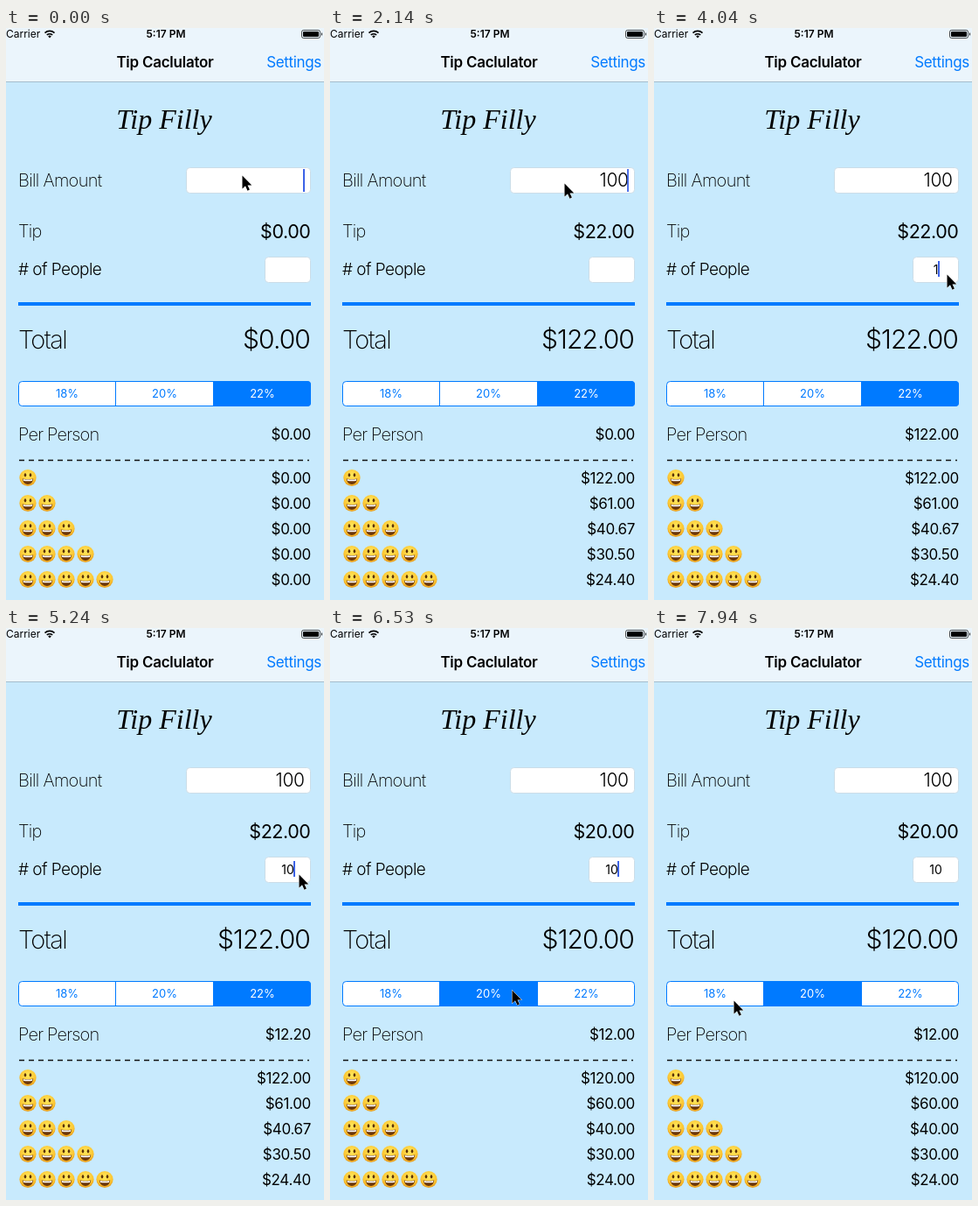
These frames come from a looping animation (364 px wide and 653 px high, 8 s). An HTML page:

```html
<!DOCTYPE html>
<html lang="en">
<head>
<meta charset="utf-8">
<title>Tip calculator</title>
<style>
  html, body { margin: 0; width: 100%; height: 100%; overflow: hidden; background: #c8eafd; }
  svg { display: block; width: 364px; height: 653px; }
  text { font: 400 17px Inter, "Open Sans", sans-serif; letter-spacing: -.02em; }
  .end { text-anchor: end; }
  .mid { text-anchor: middle; }
  .label { font-size: 20px; font-weight: 200; letter-spacing: -.035em; }
  .status { font-size: 12px; letter-spacing: 0; }
  .seg { font-size: 13px; letter-spacing: 0; }
  .field { fill: #fff; stroke: #cbdde8; }
  .blue { fill: #007aff; }
</style>
</head>
<body>
<svg viewBox="0 0 364 653">
  <defs>
    <radialGradient id="skin" cy=".35" r=".7">
      <stop stop-color="#ffe95c"/><stop offset=".65" stop-color="#fcc633"/><stop offset="1" stop-color="#e08a12"/>
    </radialGradient>
    <g id="face">
      <circle r="9.6" fill="url(#skin)"/>
      <ellipse cx="-3" cy="-3.2" rx="1.3" ry="2.1" fill="#5b3208"/>
      <ellipse cx="3" cy="-3.2" rx="1.3" ry="2.1" fill="#5b3208"/>
      <path d="M-6.3 1Q0 2.4 6.3 1Q5.4 7.4 0 7.4T-6.3 1Z" fill="#6b3609"/>
      <path d="M-5.4 1.6Q0 2.6 5.4 1.6L5 3.4Q0 4.2-5 3.4Z" fill="#fff"/>
    </g>
  </defs>

  <rect width="364" height="653" fill="#c8eafd"/>
  <rect width="364" height="61" fill="#ebf5fc"/>
  <rect y="61" width="364" height="1" fill="#a5bccb"/>

  <text class="status" y="11">Carrier</text>
  <g fill="none" stroke="#000" stroke-width="1.7">
    <path d="M44.5 5.6a8 8 0 0 1 11 0M46.8 8a4.7 4.7 0 0 1 6.4 0"/>
  </g>
  <path d="M50 11.4l-1.8-2a2.6 2.6 0 0 1 3.6 0z"/>
  <text class="status mid" x="183" y="11" style="font-weight:600">5:17 PM</text>
  <rect x="338.5" y="2.5" width="21" height="9" rx="2" fill="none" stroke="#000" stroke-width=".7"/>
  <rect x="340" y="4" width="18" height="6" rx="1"/>
  <path d="M361 5q2 2 0 4z"/>

  <text class="mid" x="182" y="45" style="font-weight:600;letter-spacing:-.015em">Tip Caclulator</text>
  <text class="end blue" x="361" y="45">Settings</text>
  <text class="mid" x="181" y="115" style="font:italic 32px 'Liberation Serif',serif;letter-spacing:0">Tip Filly</text>

  <text class="label" x="14" y="181">Bill Amount</text>
  <rect class="field" x="206.5" y="159.5" width="142" height="29" rx="4"/>
  <text class="end" id="bill" x="341.5" y="181" style="font-size:21px;font-weight:300"></text>

  <text class="label" x="14" y="239">Tip</text>
  <text class="end" id="tip" x="348.5" y="239.5" style="font-size:21.5px"></text>

  <text x="14" y="282" style="font-size:19px;font-weight:300;letter-spacing:-.03em"># of People</text>
  <rect class="field" x="296.5" y="261.5" width="52" height="29" rx="4"/>
  <text class="mid" id="people" x="322.5" y="280.5" style="font-size:14px;letter-spacing:0"></text>

  <rect class="blue" x="14" y="313" width="335" height="4"/>
  <text x="14" y="366" style="font-size:29px;font-weight:200;letter-spacing:-.055em">Total</text>
  <text class="end" id="total" x="348" y="366" style="font-size:30px;font-weight:300;letter-spacing:-.03em"></text>

  <rect x="14.5" y="403.5" width="334" height="28" rx="4" fill="#fff"/>
  <g id="segments"></g>
  <rect x="14.5" y="403.5" width="334" height="28" rx="4" fill="none" stroke="#007aff"/>

  <text class="label" x="14" y="471" style="letter-spacing:-.04em">Per Person</text>
  <text class="end" id="each" x="349" y="470"></text>
  <path d="M15 493.5H347" stroke="#111" stroke-width="1.4" stroke-dasharray="6 5"/>
  <g id="rows"></g>

  <rect id="caret" width="2" fill="#3d63e6"/>
  <path id="mouse" d="M0 0V15L3.5 11.8L6 17.2L8.4 16.1L6 10.9H10.8Z" stroke="#fff" stroke-width="1" stroke-linejoin="round" paint-order="stroke"/>
</svg>
<script>
const LOOP = 8000, STEP = 118.6;
const $ = id => document.getElementById(id);
const money = n => '$' + n.toFixed(2);

// All tables below are keyed by step number.
const path = [
  [1, 270, 168], [6, 268, 177], [18, 268, 177], [22, 346, 272], [24, 335, 281],
  [44, 335, 281], [50, 208, 405], [52, 208, 413], [60, 208, 413], [66, 97, 428], [67, 91, 425]
];
const blink = [
  [0, 1], [2, .4], [3, 0], [6, 1], [18, .9], [19, 0], [22, 1],
  [25, .5], [26, .85], [30, .4], [31, 0], [34, 1], [40, .4], [41, 0], [44, 1],
  [48, .4], [49, 0], [52, 1], [56, .4], [57, 0], [60, .45], [61, 1], [64, .4], [65, 0]
];
const bills = [[0, 0], [8, 1], [11, 10], [14, 100]];
const counts = [[0, 0], [34, 1], [35, 10]];
const rates = [[0, 22], [55, 20]];
const at = (table, k) => table.filter(e => e[0] <= k).pop()[1];

function mousePos(k) {
  const i = path.findIndex(p => p[0] > k);
  if (i === 0) return path[0].slice(1);
  if (i < 0) return path[path.length - 1].slice(1);
  const [a, b] = [path[i - 1], path[i]];
  const u = (k - a[0]) / (b[0] - a[0]), s = u * u * (3 - 2 * u);
  return [1, 2].map(j => Math.round(a[j] + (b[j] - a[j]) * s));
}

const edges = [14, 125, 237, 349];
$('segments').innerHTML = [18, 20, 22].map((r, i) => {
  const l = edges[i], w = edges[i + 1] - l;
  return `<rect id="box${r}" class="blue" x="${l}" y="403" width="${w + (i < 2)}" height="29" rx="${i === 1 ? 0 : 4}"/>
    ${i ? `<rect class="blue" x="${l}" y="403" width="1" height="29"/>` : ''}
    <text id="rate${r}" class="seg mid" x="${l + w / 2 + .5}" y="422">${r}%</text>`;
}).join('');

$('rows').innerHTML = [1, 2, 3, 4, 5].map(n => {
  const y = 484.5 + 29 * n;
  let faces = '';
  for (let i = 0; i < n; i++) faces += `<use href="#face" x="${25 + 22 * i}" y="${y}"/>`;
  return `${faces}<text class="end" id="split${n}" x="349" y="${y + 6.5}"></text>`;
}).join('');

function draw(t) {
  const k = Math.floor(t / STEP + .08);
  const bill = at(bills, k), count = at(counts, k), rate = at(rates, k);
  const total = bill * (1 + rate / 100);

  $('bill').textContent = bill || '';
  $('people').textContent = count || '';
  $('tip').textContent = money(bill * rate / 100);
  $('total').textContent = money(total);
  $('each').textContent = money(count ? total / count : 0);
  for (let n = 1; n <= 5; n++) $('split' + n).textContent = money(total / n);
  for (const r of [18, 20, 22]) {
    $('box' + r).setAttribute('opacity', r === rate ? 1 : 0);
    $('rate' + r).setAttribute('fill', r === rate ? '#fff' : '#007aff');
  }

  const inBill = k < 25, caret = $('caret');
  caret.setAttribute('x', inBill ? 340 : count === 10 ? 329 : count ? 325 : 321.5);
  caret.setAttribute('y', inBill ? 161 : 266);
  caret.setAttribute('height', inBill ? 26 : 18);
  caret.setAttribute('opacity', at(blink, k));
  const [x, y] = mousePos(k);
  $('mouse').setAttribute('transform', `translate(${x + .5} ${y + .5})`);
}

const start = performance.now();
function tick() {
  draw((performance.now() - start) % LOOP);
  requestAnimationFrame(tick);
}
tick();
</script>
</body>
</html>
```
